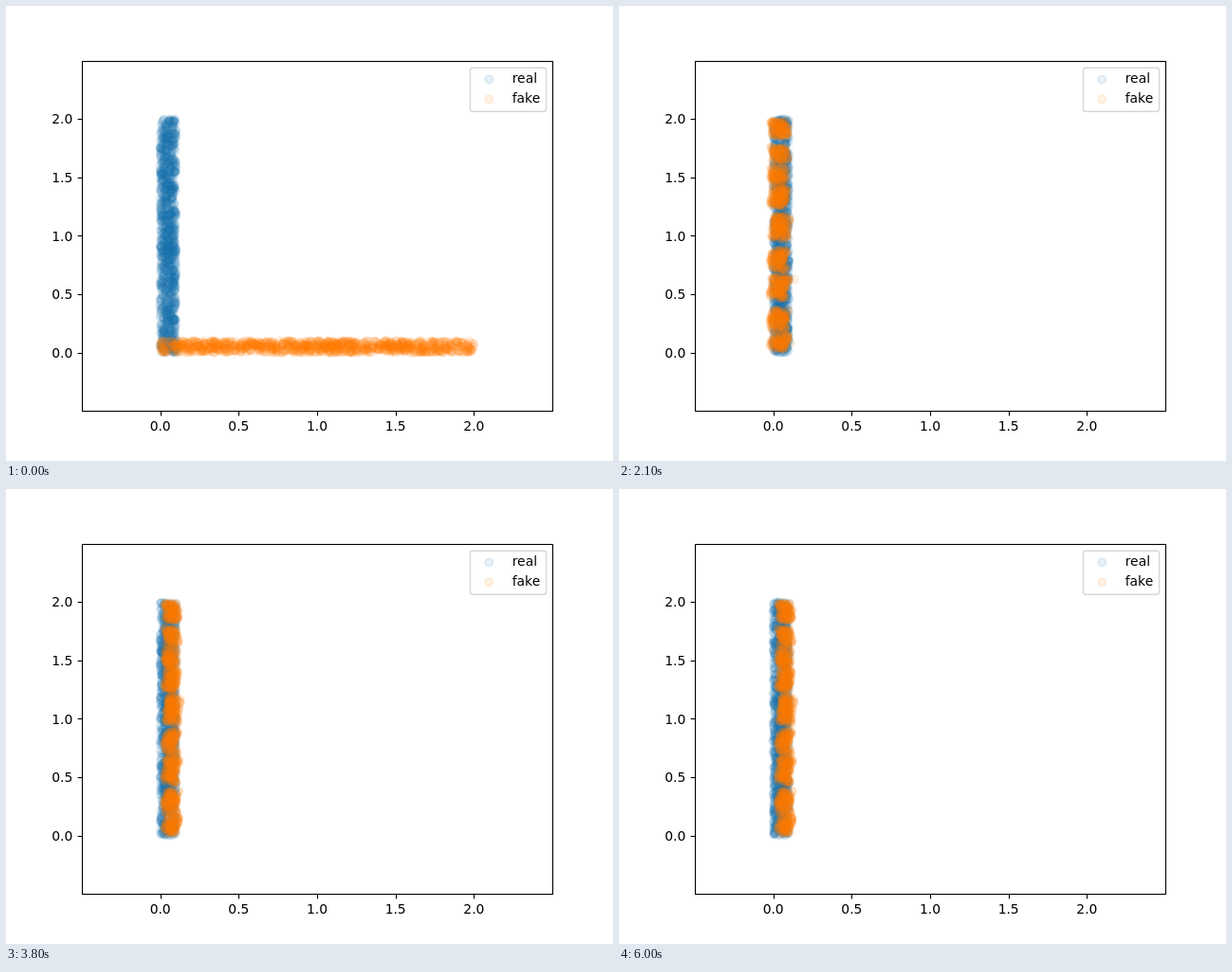
An HTML page with a canvas for the animation above (6.1 s loop, 640 by 480 pixels).

```html
<!DOCTYPE html>
<html lang="en">
<head>
<meta charset="utf-8">
<title>Scatter: real and fake</title>
<style>
html, body { margin: 0; width: 100%; height: 100%; overflow: hidden; background: #fff; }
canvas { display: block; }
</style>
</head>
<body>
<canvas id="plot" width="640" height="480"></canvas>
<script>
const ctx = document.getElementById('plot').getContext('2d');
const LOOP = 6100, STEP = 100, COUNT = 1000;
const BLUE = 'rgba(31,119,180,.1)', ORANGE = 'rgba(255,127,14,.1)';
const CLUMPS = [.1, .25, .58, .77, 1.08, 1.35, 1.53, 1.68, 1.95];
// [time, centre of the fake column, its width, pull towards the clumps]
const DRIFT = [
  [0, .04, .1, .35], [1300, .04, .1, .35], [2100, .036, .1, .3], [3000, .083, .075, .2],
  [3800, .071, .08, .2], [4600, .076, .08, .2], [6100, .075, .08, .2]
];

const px = x => 80 + (x + .5) * 496 / 3;
const py = y => 427.2 - (y + .5) * 123.2;
const snap = v => Math.round(v) + .5;

function makeRandom(seed) {
  return () => {
    seed = seed + 0x6D2B79F5 | 0;
    let n = Math.imul(seed ^ seed >>> 15, 1 | seed);
    n = n + Math.imul(n ^ n >>> 7, 61 | n) ^ n;
    return ((n ^ n >>> 14) >>> 0) / 4294967296;
  };
}

const random = makeRandom(7);
const particles = Array.from({ length: COUNT }, (_, i) => {
  const p = { u: random(), v: random(), tau: 330 };
  if (i < 14) {   // stragglers
    p.tau = 550;
    p.u = .45 + .55 * p.u;
    p.v = i < 6 ? .32 + .02 * p.v : i < 13 ? .07 * p.v : .98;
  }
  const y = 2 * p.v;
  p.clump = CLUMPS.reduce((a, b) => Math.abs(b - y) < Math.abs(a - y) ? b : a);
  return p;
});

function driftAt(t) {
  const i = DRIFT.findIndex(k => k[0] > t), a = DRIFT[i - 1], b = DRIFT[i];
  const f = (t - a[0]) / (b[0] - a[0]);
  return a.slice(1).map((v, j) => v + (b[j + 1] - v) * f);
}

function dot(x, y, color) {
  ctx.fillStyle = ctx.strokeStyle = color;
  ctx.lineWidth = 2.08;
  ctx.beginPath();
  ctx.arc(x, y, 4.17, 0, 2 * Math.PI);
  ctx.fill();
  ctx.stroke();
}

function drawReal(step) {
  const rnd = makeRandom(1000 + step * 97);
  for (let i = 0; i < COUNT; i++) dot(px(.1 * rnd()), py(2 * rnd()), BLUE);
}

function drawFake(t) {
  const [centre, width, pull] = driftAt(t);
  for (const { u, v, tau, clump } of particles) {
    const left = Math.exp(-t / tau);
    const y = 2 * v + pull * (clump - 2 * v);
    const wave = -.008 * Math.cos(8 * Math.PI * (y - .53))
      + .01 * Math.exp(-(((y - 1.1) / .2) ** 2));
    const x = centre + (u - .5) * width + wave;
    dot(px(x + (2 * u - x) * left), py(y + (.1 * v - y) * left), ORANGE);
  }
}

function line(x1, y1, x2, y2) {
  ctx.beginPath();
  ctx.moveTo(x1, y1);
  ctx.lineTo(x2, y2);
  ctx.stroke();
}

function label(text, x, y, align) {
  ctx.textAlign = align;
  ctx.fillText(text, x, y);
}

function drawAxes() {
  ctx.strokeStyle = ctx.fillStyle = '#000';
  ctx.lineWidth = 1.11;
  ctx.font = '13.89px "DejaVu Sans", sans-serif';
  ctx.strokeRect(80.5, 58.5, 496, 369);
  for (let v = 0; v <= 2; v += .5) {
    const x = snap(px(v)), y = snap(py(v));
    line(x, 427.5, x, 432.4);
    line(80.5, y, 75.6, y);
    label(v.toFixed(1), px(v), 448, 'center');
    label(v.toFixed(1), 70.3, py(v) + 5.2, 'right');
  }
}

function drawLegend() {
  ctx.fillStyle = 'rgba(255,255,255,.8)';
  ctx.strokeStyle = 'rgba(204,204,204,.8)';
  ctx.lineWidth = 1.39;
  ctx.beginPath();
  ctx.roundRect(489.4, 65.3, 80.2, 46, 2.8);
  ctx.fill();
  ctx.stroke();
  dot(509.3, 77.4, BLUE);
  dot(509.3, 98.2, ORANGE);
  ctx.fillStyle = '#000';
  label('real', 533.7, 81, 'left');
  label('fake', 533.7, 102, 'left');
}

let shown = -1;
function frame() {
  const step = Math.floor(performance.now() % LOOP / STEP);
  if (step !== shown) {
    shown = step;
    ctx.fillStyle = '#fff';
    ctx.fillRect(0, 0, 640, 480);
    drawReal(step);
    drawFake(step * STEP);
    drawAxes();
    drawLegend();
  }
  requestAnimationFrame(frame);
}
frame();
</script>
</body>
</html>
```
